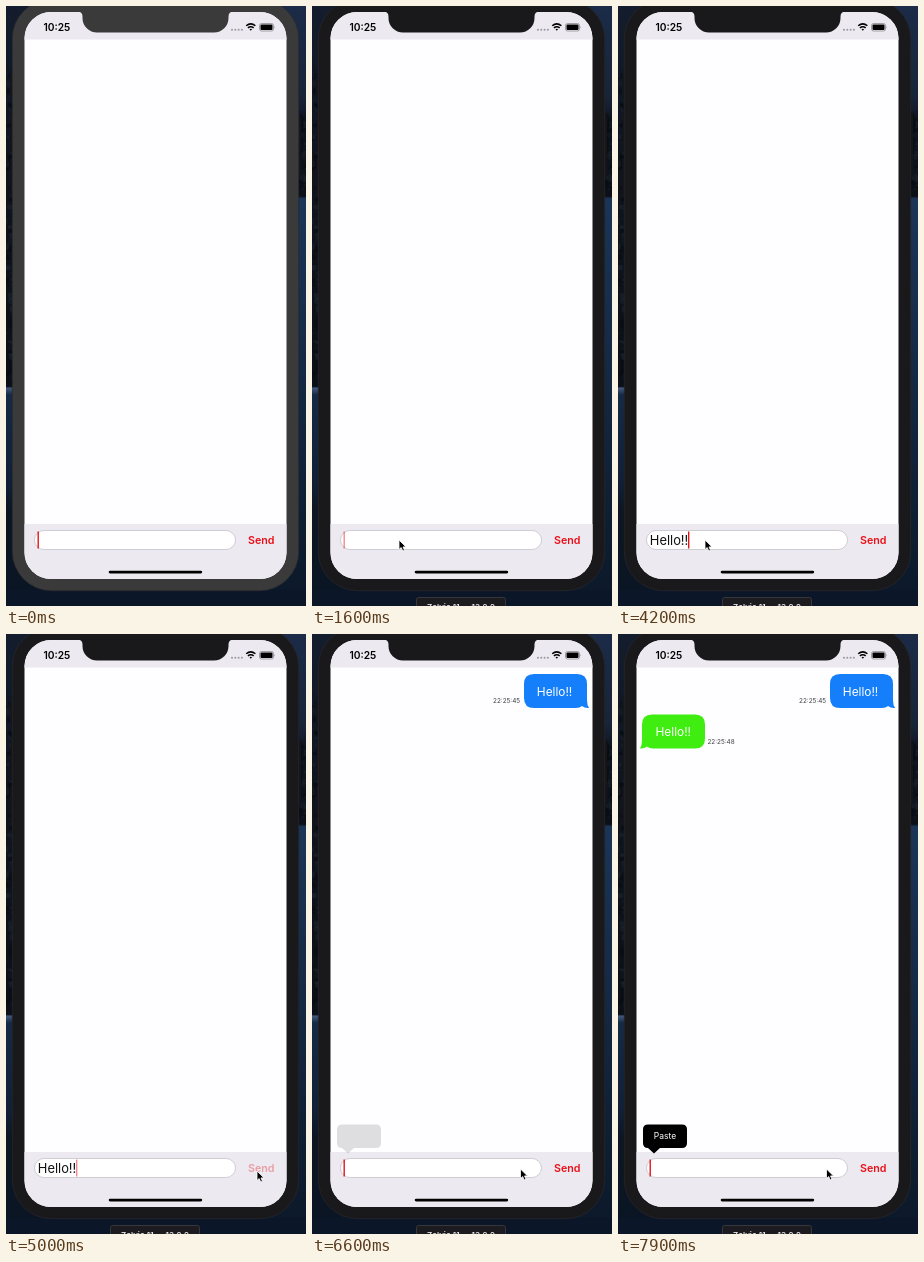
An HTML page that plays this animation: 300 by 600 pixels, repeating every 8000 ms.

```html
<!DOCTYPE html>
<html lang="en">
<head>
<meta charset="utf-8">
<title>Chat demo</title>
<style>
html, body { margin: 0; width: 100%; height: 100%; overflow: hidden; background: #0a1524; }
svg { display: block; width: 300px; height: 600px; font-family: Inter, Roboto, sans-serif; }
.time { font-size: 6.4px; fill: #3c3c40; }
.words { font-size: 11.9px; fill: #fff; }
</style>
</head>
<body>
<svg viewBox="0 0 300 600">
  <defs>
    <linearGradient id="left" x2="0" y2="1">
      <stop offset="0" stop-color="#141d2d"/><stop offset=".12" stop-color="#111927"/>
      <stop offset=".28" stop-color="#0f141d"/><stop offset=".634" stop-color="#0b1018"/>
      <stop offset=".637" stop-color="#41587a"/><stop offset=".648" stop-color="#152a45"/>
      <stop offset=".8" stop-color="#101f35"/><stop offset=".84" stop-color="#0d1622"/>
      <stop offset="1" stop-color="#0a1524"/>
    </linearGradient>
    <linearGradient id="right" x2="0" y2="1">
      <stop offset="0" stop-color="#1b2b48"/><stop offset=".15" stop-color="#182438"/>
      <stop offset=".2" stop-color="#0e141f"/><stop offset=".317" stop-color="#0b1018"/>
      <stop offset=".321" stop-color="#1b3557"/><stop offset=".6" stop-color="#142944"/>
      <stop offset="1" stop-color="#0b1828"/>
    </linearGradient>
    <clipPath id="screen"><rect x="18.500" y="6" width="262" height="567" rx="26.500"/></clipPath>
  </defs>

  <rect width="150" height="600" fill="url(#left)"/>
  <rect x="150" width="150" height="600" fill="url(#right)"/>
  <g id="rocks"></g>
  <rect y="584" width="300" height="16" fill="#0b1728"/>

  <path d="M4.500 70h3v22h-3zM4.500 106h3v40h-3zM4.500 152h3v40h-3zM292 108h3v63h-3z" fill="#151418"/>
  <rect id="bezel" x="6.300" y="-6.500" width="286.400" height="591.200" rx="39" stroke="#2a292d" stroke-width=".7"/>
  <g clip-path="url(#screen)">
    <rect x="18" y="6" width="263" height="567" fill="#fefdff"/>
    <path d="M18 6h263v27.500H18zM18 518h263v55H18z" fill="#eceaf0"/>
  </g>
  <path id="notch" d="M72 5.500Q76.500 6 76.500 10.500V12A14.500 14.500 0 0 0 91 26.500H208A14.500 14.500 0 0 0 222.500 12V10.500Q222.500 6 227 5.500Z"/>

  <text x="37.500" y="25.100" font-size="10.200" font-weight="600">10:25</text>
  <g fill="#99989e">
    <circle cx="226" cy="23.700" r="1"/><circle cx="229.300" cy="23.700" r="1"/>
    <circle cx="232.600" cy="23.700" r="1"/><circle cx="235.900" cy="23.700" r="1"/>
  </g>
  <g fill="none" stroke="#000" stroke-width="1.500">
    <path d="M240.200 19.800Q244.800 15.900 249.400 19.800M241.900 21.900Q244.800 19.500 247.700 21.900"/>
    <path d="M244.800 24.800l-1.300-1.500q1.300-.9 2.600 0z" fill="#000" stroke="none"/>
    <rect x="253.500" y="17.500" width="14" height="7.500" rx="2" stroke="#8d8b91" stroke-width=".8"/>
  </g>
  <rect x="254.500" y="18.500" width="12" height="5.500" rx="1"/>
  <path d="M268.500 20q1.300 1.200 0 2.500z" fill="#8d8b91"/>

  <g id="sent">
    <path d="M222 40H265Q275 40 275 50V66Q275 71 277 74Q273 74.500 270 72Q268 74 264 74H222Q212 74 212 64V50Q212 40 222 40Z" fill="#147efb"/>
    <text class="words" x="224.800" y="61.800">Hello!!</text>
    <text class="time" x="181" y="69.300">22:25:45</text>
  </g>
  <g id="reply">
    <path d="M77 80.500H34Q24 80.500 24 90.500V106.500Q24 111.500 22 114.500Q26 115 29 112.500Q31 114.500 35 114.500H77Q87 114.500 87 104.500V90.500Q87 80.500 77 80.500Z" fill="#3fee10"/>
    <text class="words" x="37.500" y="102.300">Hello!!</text>
    <text class="time" x="89.400" y="109.800">22:25:48</text>
  </g>

  <rect x="28.500" y="524.500" width="201" height="19" rx="9.500" fill="#fff" stroke="#c5c3c9" stroke-width=".8"/>
  <text id="draft" x="31.800" y="538.800" font-size="12.900" fill="#111"></text>
  <rect id="caret" y="525.500" width="1.400" height="17" fill="#e0151c"/>
  <text id="send" x="242" y="537.700" font-size="10.700" font-weight="600" fill="#ea1019">Send</text>
  <rect x="102.700" y="564.700" width="93.500" height="2.800" rx="1.400"/>

  <g id="menu">
    <path d="M30 490.500H64Q69 490.500 69 495.500V509Q69 514 64 514H42L36 519.500L30 514Q25 514 25 509V495.500Q25 490.500 30 490.500Z"/>
    <text id="paste" x="47" y="505.300" font-size="8.500" fill="#fff" text-anchor="middle">Paste</text>
  </g>

  <g id="label">
    <rect x="104.500" y="591.500" width="89" height="16" rx="2" fill="#1c1b1f" stroke="#37363b"/>
    <text x="149" y="603.500" font-size="8" font-weight="600" fill="#e8e8ea" text-anchor="middle">Zelvio 11 — 13.2.2</text>
  </g>
  <path id="mouse" d="M0 0V9.500L2.200 7.500L3.800 11L5.500 10.300L4 6.900H7Z" stroke="#fff" stroke-width=".8"/>
</svg>
<script>
const $ = id => document.getElementById(id);
const LOOP = 8000, STEP = 100;

// Each key is [time, value]; values between keys are eased.
function ease(keys, t) {
  const i = keys.findIndex(k => k[0] > t);
  if (i === 0) return keys[0][1];
  if (i < 0) return keys[keys.length - 1][1];
  const [t0, a] = keys[i - 1], [t1, b] = keys[i];
  const u = (t - t0) / (t1 - t0);
  return a + (b - a) * u * u * (3 - 2 * u);
}

const mouseX = [[200, 70], [500, 87], [4500, 87], [4950, 251], [5300, 251], [5500, 233], [6000, 208.5]];
const mouseY = [[200, 600], [500, 534], [4500, 534], [4950, 537], [5300, 537], [5500, 536], [6000, 535]];
const typed = [[1800, "H"], [2000, "He"], [2300, "Hel"], [2400, "Hell"], [2600, "Hello"],
  [4000, "Hello!"], [4200, "Hello!!"], [5100, ""]];
const blink = [[900, 1], [1100, 0], [1200, 0], [1400, 1], [1500, 1], [1700, 0], [1790, 0], [1800, 1],
  [2900, 1], [3100, 0], [3150, 0], [3300, 1], [3500, 1], [3700, 0], [3990, 0], [4000, 1],
  [4600, 1], [4800, 0], [4900, 0], [5100, 1], [5600, 1], [5800, 0], [5900, 0], [6100, 1],
  [7100, 1], [7300, 0], [7400, 0], [7600, 1]];

function show(id, opacity) { $(id).setAttribute("opacity", opacity); }

function draw(t) {
  const active = t >= 200;
  for (const id of ["bezel", "notch"]) $(id).setAttribute("fill", active ? "#19181b" : "#3a3a3b");
  show("label", active ? 1 : 0);
  show("mouse", active ? 1 : 0);
  $("mouse").setAttribute("transform", `translate(${ease(mouseX, t)} ${ease(mouseY, t)})`);

  const draft = typed.reduce((text, [at, next]) => t >= at ? next : text, "");
  $("draft").textContent = draft;
  const width = draft ? $("draft").getComputedTextLength() : 0;
  $("caret").setAttribute("x", 31.5 + width);
  show("caret", ease(blink, t));

  show("send", t >= 5000 && t < 5200 ? 0.35 : 1);
  show("sent", ease([[5000, 0], [5300, 1]], t));
  show("reply", ease([[7300, 0], [7600, 1]], t));
  show("menu", ease([[6530, 0], [6850, 1]], t));
  show("paste", t >= 6700 ? 1 : 0);
}

function addRocks() {
  let seed = 7;
  const random = () => (seed = seed * 16807 % 2147483647) / 2147483647;
  const shades = ["#080b11", "#1d232d", "#121822"];
  let marks = "";
  for (let i = 0; i < 150; i++) {
    const left = i % 3 > 0;
    const x = left ? random() * 7 : 293 + random() * 7;
    const y = left ? 60 + random() * 318 : 105 + random() * 83;
    marks += `<ellipse cx="${x}" cy="${y}" rx="${1 + random() * 2}" ry="${1 + random() * 3}" fill="${shades[i % 7 % 3]}" opacity=".6"/>`;
  }
  $("rocks").innerHTML = marks;
}

function tick() {
  draw(Math.floor(performance.now() % LOOP / STEP) * STEP);
  requestAnimationFrame(tick);
}

addRocks();
tick();
</script>
</body>
</html>
```
